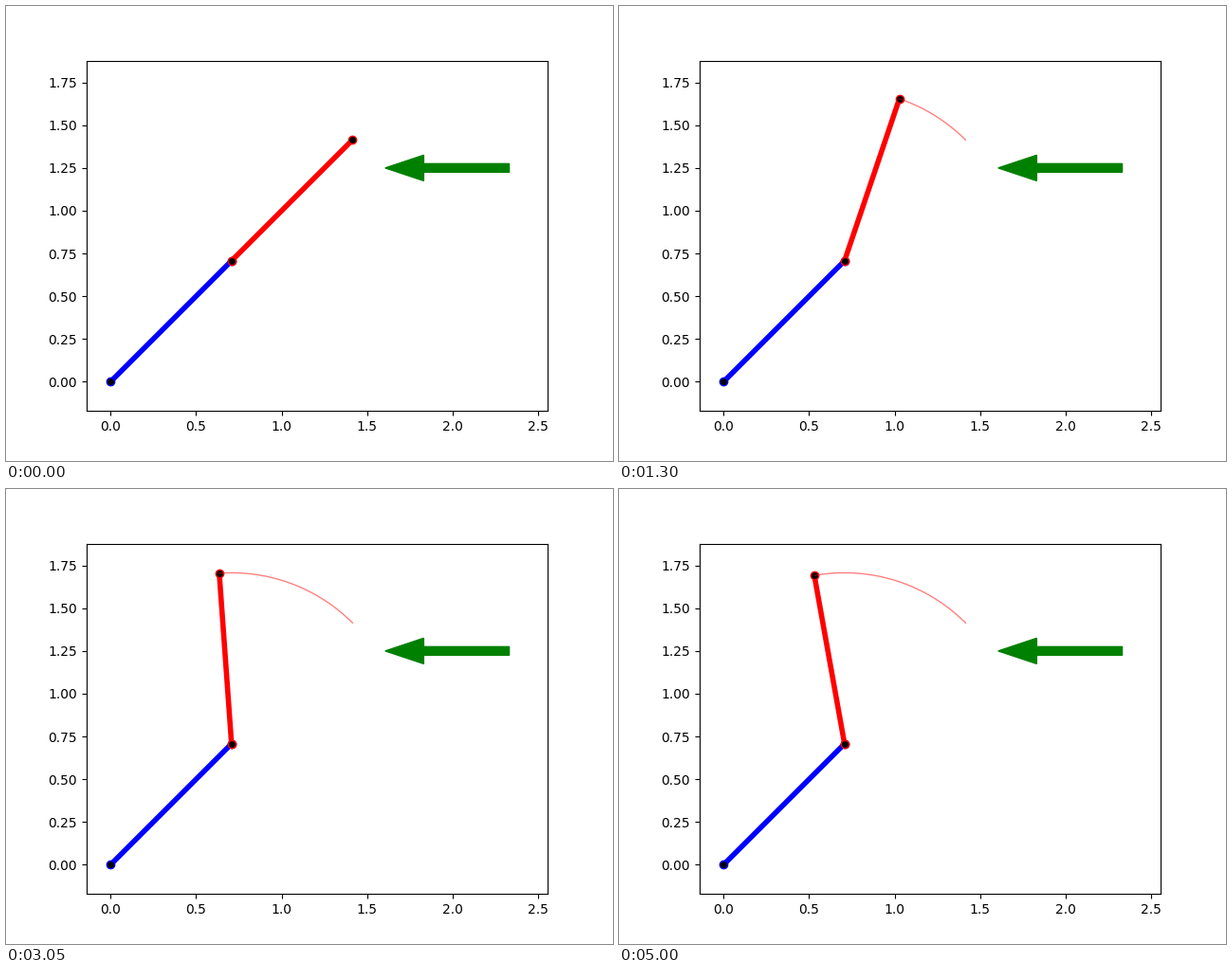
A matplotlib script for the animation above (5.05 s loop, 640 by 480 pixels).

```python
import numpy as np
import matplotlib.pyplot as plt
from matplotlib.animation import FuncAnimation

FRAMES, STEP_MS = 101, 50
REST = np.pi / 4
INERTIA, STIFFNESS, DAMPING, FORCE = 1 / 3, 1.0, 1.5, 1.0
ELBOW = np.array([np.cos(REST), np.sin(REST)])


def accel(angle, speed):
    torque = FORCE * np.sin(angle) - STIFFNESS * (angle - REST) - DAMPING * speed
    return torque / INERTIA


def swing(substeps=20):
    """Angle of the upper link at every frame (midpoint integration)."""
    dt = STEP_MS / 1000 / substeps
    angle, speed = REST, 0.0
    angles = [angle]
    for _ in range(FRAMES - 1):
        for _ in range(substeps):
            mid_angle = angle + speed * dt / 2
            mid_speed = speed + accel(angle, speed) * dt / 2
            angle += mid_speed * dt
            speed += accel(mid_angle, mid_speed) * dt
        angles.append(angle)
    return np.array(angles)


angles = swing()
tips = ELBOW[:, None] + np.array([np.cos(angles), np.sin(angles)])

fig, ax = plt.subplots(figsize=(6.4, 4.8), dpi=100)
ax.set_aspect("equal")
width, height = 1 + np.sqrt(2), 1 + ELBOW[1]
pad_x, pad_y = 0.1 * np.sqrt(2), 0.1 * height
ax.set_xlim(-pad_x, width + pad_x)
ax.set_ylim(-pad_y, height + pad_y)
ax.set_xticks(np.arange(0, 2.6, 0.5))
ax.set_yticks(np.arange(0, 1.8, 0.25))

ax.arrow(2.33, 1.25, -0.5, 0, width=0.05, color="green")


def link(color):
    return ax.plot([], [], "o-", color=color, lw=4, mfc="black")[0]


lower, upper = link("blue"), link("red")
trail, = ax.plot([], [], color="red", lw=1, alpha=0.5)
lower.set_data([0, ELBOW[0]], [0, ELBOW[1]])


def draw(i):
    x, y = tips[:, i]
    upper.set_data([ELBOW[0], x], [ELBOW[1], y])
    trail.set_data(tips[0, :i + 1], tips[1, :i + 1])
    return upper, trail


def reset():
    return draw(0)


anim = FuncAnimation(fig, draw, frames=FRAMES, init_func=reset,
                     interval=STEP_MS, repeat=True, repeat_delay=0, blit=False)
plt.show()
```
